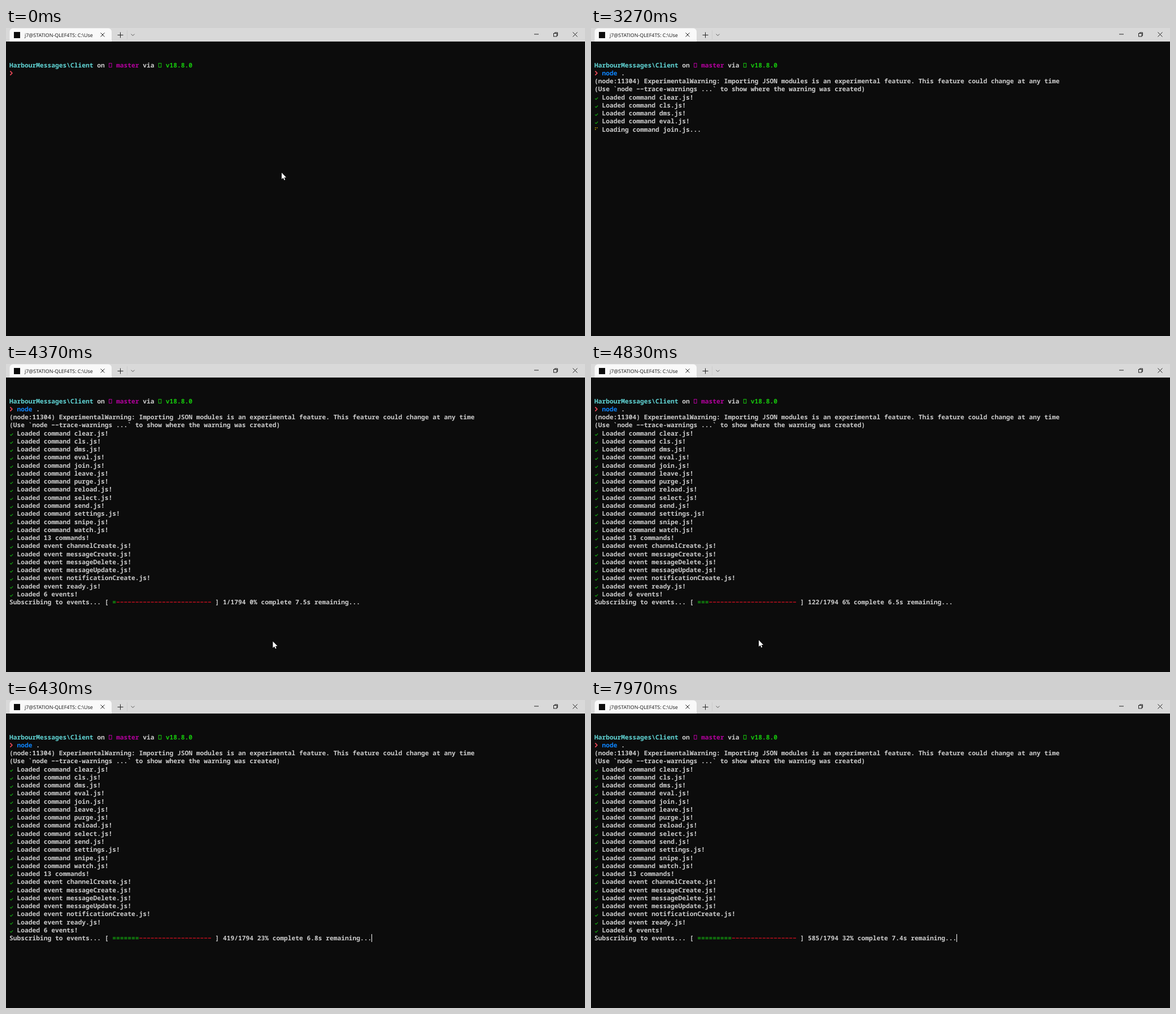
Animation of 1025 by 546 pixels, one loop 8 s. Source, as an HTML page with a canvas:

```html
<!DOCTYPE html>
<html lang="en">
<head>
<meta charset="utf-8">
<title>Terminal session</title>
<style>
html, body { margin: 0; width: 100%; height: 100%; overflow: hidden; background: #0c0c0c; }
canvas { display: block; }
</style>
</head>
<body>
<canvas id="stage" width="1025" height="546"></canvas>
<script>
const ctx = document.getElementById('stage').getContext('2d');
const LOOP = 8000;
const LEFT = 6, CELL = 6.75, ROW = 14.26, BASELINE = 69.6, CELL_TOP = 58.9;
const C = {
  text: '#cccccc', cyan: '#61d6d6', magenta: '#b4009e', lime: '#16c60c', pink: '#e74856',
  blue: '#0d84ff', green: '#13a10e', red: '#c50f1f', yellow: '#c19c00'
};

const COMMANDS = 'clear cls dms eval join leave purge reload select send settings snipe watch'.split(' ');
const EVENTS = 'channelCreate messageCreate messageDelete messageUpdate notificationCreate ready'.split(' ');
const ITEMS = [
  ...COMMANDS.map(name => `command ${name}.js`), `${COMMANDS.length} commands`,
  ...EVENTS.map(name => `event ${name}.js`), `${EVENTS.length} events`
];
const FIRST_ITEM_ROW = 4, BAR_ROW = 25;

const CARET_ON = 1170, TYPING = 1430, ENTER = 1900, WARNED = 2130, LOADING = 2800;
const COMMAND_LINE = 'node .';
const TOTAL = 1794, BAR_START = 4362.5, BAR_WIDTH = 25;

// Key points: [time, value, ...]
const COUNT = [[BAR_START, 0], [4833.3, 122], [5733.3, 311], [7100, 521], [7966.6, 585]];
const MOUSE = [[3970, 576, 389], [4070, 584, 493], [4833.3, 297, 489.5],
  [5070, 389, 477], [5980, 389, 477], [6250, 430, 548]];

// Linear interpolation of column i between key points.
function sample(keys, t, i = 1) {
  const next = keys.findIndex(key => t <= key[0]);
  if (next < 1) return keys[next < 0 ? keys.length - 1 : 0][i];
  const a = keys[next - 1], b = keys[next];
  return a[i] + (b[i] - a[i]) * (t - a[0]) / (b[0] - a[0]);
}

// Number of evenly spaced steps taken since a start time.
function steps(t, start, interval, max) {
  return Math.max(0, Math.min(max, Math.floor((t - start) / interval) + 1));
}

function line(color, width, ...points) {
  ctx.strokeStyle = color;
  ctx.lineWidth = width;
  ctx.beginPath();
  points.forEach(([x, y]) => ctx.lineTo(x, y));
  ctx.stroke();
}

const colX = col => LEFT + col * CELL;
const baseY = row => BASELINE + row * ROW;

// Places text on the character grid and returns the next free column.
function print(row, col, text, color = C.text) {
  ctx.font = '600 11.25px "Noto Sans Mono", "DejaVu Sans Mono", monospace';
  ctx.textRendering = 'geometricPrecision';
  ctx.fillStyle = color;
  for (const ch of text) {
    if (ch !== ' ') ctx.fillText(ch, colX(col), baseY(row));
    col++;
  }
  return col;
}

function caret(row, col) {
  ctx.fillStyle = '#ffffff';
  ctx.fillRect(Math.floor(colX(col)), Math.round(CELL_TOP + row * ROW), 1, 14);
}

function emptyGlyph(col, color) {
  ctx.strokeStyle = color;
  ctx.lineWidth = 1;
  ctx.strokeRect(colX(col) + 1, 62.5, 4.5, 7);
}

function checkMark(row) {
  const y = baseY(row);
  line(C.green, 1.2, [7.2, y - 1.6], [9, y], [12.2, y - 3.4]);
}

function spinner(row) {
  const y = Math.round(baseY(row)) - 8;
  ctx.fillStyle = C.yellow;
  [[7, y], [10, y], [7, y + 3]].forEach(([x, dotY]) => ctx.fillRect(x, dotY, 1.6, 1.6));
}

function drawTab() {
  ctx.fillStyle = '#f9f9f9';
  ctx.beginPath();
  ctx.roundRect(6.5, 0.5, 180.5, 23.5, [6, 6, 0, 0]);
  ctx.fill();
  ctx.fillStyle = '#0c0c0c';
  ctx.fillRect(14, 7, 11, 11);
  ctx.font = '500 8.9px "Open Sans", "Noto Sans", sans-serif';
  ctx.fillStyle = '#111111';
  ctx.fillText('j7@STATION-QLEF4TS: C:\\Use', 33, 15.7);
}

function drawWindow() {
  ctx.fillStyle = '#0c0c0c';
  ctx.fillRect(0, 0, 1025, 546);
  ctx.fillStyle = '#d9d9d9';
  ctx.fillRect(0, 0, 1025, 24);
  drawTab();

  const ink = '#222222';
  const cross = (x, y, r) => {
    line(ink, 1, [x - r, y - r], [x + r, y + r]);
    line(ink, 1, [x + r, y - r], [x - r, y + r]);
  };
  cross(171, 12, 3.5);
  cross(1007.5, 11.5, 4);
  line(ink, 1, [197.5, 12.5], [207.5, 12.5]);
  line(ink, 1, [202.5, 7.5], [202.5, 17.5]);
  line('#cbcbcb', 1, [214.5, 4], [214.5, 20]);
  line('#555555', 1, [221.5, 10.7], [224.5, 13.7], [227.5, 10.7]);
  line(ink, 1, [935, 11], [943, 11]);
  ctx.strokeRect(969.5, 9.5, 5.5, 5.5);
  line(ink, 1, [971.5, 9.5], [971.5, 8], [976.5, 8], [976.5, 13.5], [975, 13.5]);
}

function drawPrompt(t) {
  print(0, 0, 'HarbourMessages\\Client', C.cyan);
  print(0, 23, 'on');
  emptyGlyph(26, C.magenta);
  print(0, 28, 'master', C.magenta);
  print(0, 35, 'via');
  emptyGlyph(39, C.lime);
  print(0, 41, 'v18.8.0', C.lime);
  line(C.pink, 1.8, [7.4, 76.4], [10.8, 80], [7.4, 83.6]);

  const typed = steps(t, TYPING, 70, COMMAND_LINE.length);
  print(1, 2, COMMAND_LINE.slice(0, Math.min(typed, 4)), C.blue);
  print(1, 6, COMMAND_LINE.slice(4, typed));
  if (t >= CARET_ON && t < ENTER) caret(1, 2 + typed);
  if (t >= ENTER && t < WARNED) caret(2, 0);
}

function drawWarning(t) {
  if (t < WARNED) return;
  print(2, 0, '(node:11304) ExperimentalWarning: Importing JSON modules is an experimental feature. This feature could change at any time');
  print(3, 0, '(Use `node −−trace-warnings ...` to show where the warning was created)');
  if (t < WARNED + 500) caret(4, 0);
}

function drawItems(t) {
  if (t < LOADING) return;
  // Three bursts, with a pause after each.
  const loaded = steps(t, LOADING, 130, 2) + steps(t, 3230, 30, 13) + steps(t, 4270, 16, 6);
  ITEMS.slice(0, loaded).forEach((item, i) => {
    checkMark(FIRST_ITEM_ROW + i);
    print(FIRST_ITEM_ROW + i, 2, `Loaded ${item}!`);
  });
  if (loaded < ITEMS.length) {
    spinner(FIRST_ITEM_ROW + loaded);
    print(FIRST_ITEM_ROW + loaded, 2, `Loading ${ITEMS[loaded]}...`);
  }
}

function drawProgress(t) {
  if (t < BAR_START) return;
  const count = Math.round(sample(COUNT, t));
  const filled = Math.round(BAR_WIDTH * count / TOTAL);
  const percent = Math.floor(100 * count / TOTAL);
  const eta = count ? (t - BAR_START) / 1000 * (TOTAL / count - 1) : 0;
  let col = print(BAR_ROW, 0, 'Subscribing to events... [ ');
  col = print(BAR_ROW, col, '='.repeat(filled + 1), C.green);
  col = print(BAR_ROW, col, '−'.repeat(BAR_WIDTH - filled), C.red);
  col = print(BAR_ROW, col, ` ] ${count}/${TOTAL} ${percent}% complete ${eta.toFixed(1)}s remaining...`);
  if (t >= 5090) caret(BAR_ROW, col);
}

function drawArrow(x, y) {
  const outline = [[0, 0], [0, 11.6], [2.7, 9.1], [4.5, 13.2], [6.2, 12.4], [4.5, 8.5], [8.1, 8.4]];
  ctx.beginPath();
  outline.forEach(([dx, dy]) => ctx.lineTo(x + dx, y + dy));
  ctx.closePath();
  ctx.strokeStyle = '#000000';
  ctx.lineWidth = 1;
  ctx.stroke();
  ctx.fillStyle = '#ffffff';
  ctx.fill();
}

// The pointer hides while typing and returns later.
function drawMouse(t) {
  if (t < TYPING) drawArrow(488, 256.5);
  else if (t >= MOUSE[0][0]) drawArrow(sample(MOUSE, t, 1), sample(MOUSE, t, 2));
}

function render(now) {
  // The screen refreshes thirty times a second.
  const t = Math.floor((now % LOOP + 5) * 3 / 100) * 100 / 3;
  drawWindow();
  drawPrompt(t);
  drawWarning(t);
  drawItems(t);
  drawProgress(t);
  drawMouse(t);
}

const start = performance.now();
function loop() {
  render(performance.now() - start);
  requestAnimationFrame(loop);
}
loop();
</script>
</body>
</html>
```
